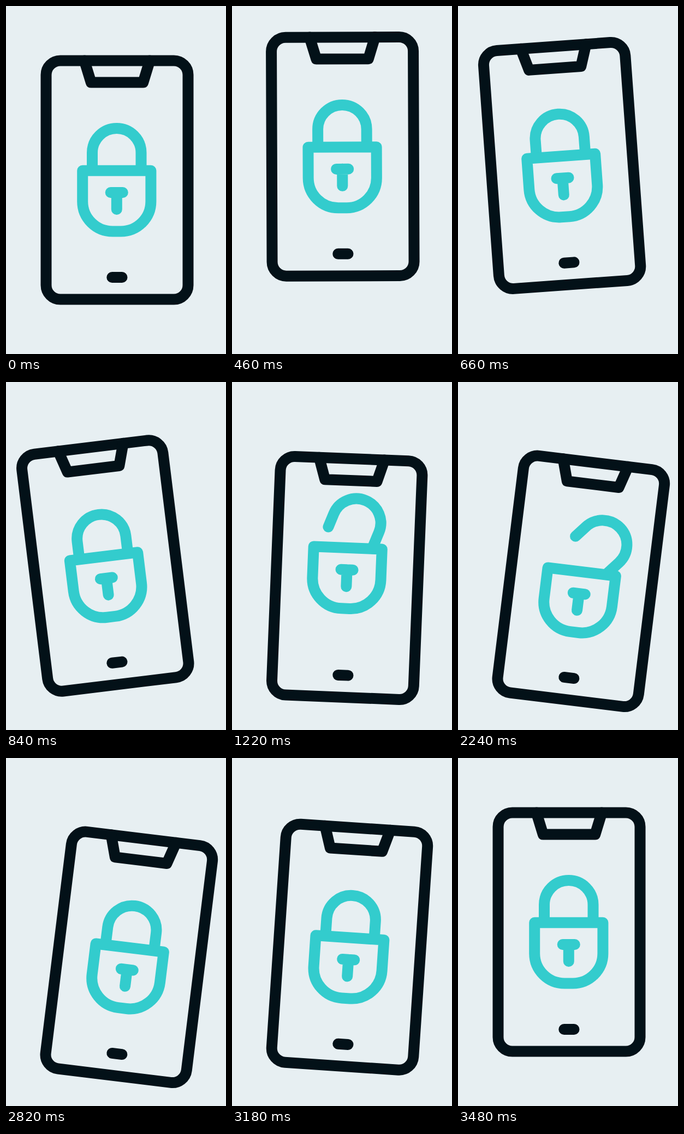
An HTML page for the animation above (3.6 s loop, 403x640 px).

```html
<!DOCTYPE html>
<html lang="en">
<head>
<meta charset="utf-8">
<title>Phone unlock</title>
<style>
  html, body { margin: 0; width: 100%; height: 100%; overflow: hidden; background: #e7eff2; }
  svg { display: block; width: 100%; height: 100%; }
  path, rect { fill: none; stroke-width: 20; stroke-linecap: round; stroke-linejoin: round; }
  #phone { stroke: #031118; }
  #lock { stroke: #33cccd; }
</style>
</head>
<body>
<svg viewBox="0 0 403 640">
  <g id="phone">
    <rect x="73.5" y="100.5" width="260" height="439" rx="26"/>
    <path d="M143.6 100.5 L155.8 140.5 H251.2 L263.4 100.5"/>
    <path d="M194.3 499 H212.5"/>
    <g id="lock">
      <path id="shackle" d="M158 296 V269.8 A44.75 44.75 0 0 1 247.5 269.8 V302"/>
      <path d="M140.2 302.7 H265.4 V359.5 A55 55 0 0 1 210.4 414.5 H195.2 A55 55 0 0 1 140.2 359.5 Z"/>
      <path d="M191.7 343 H213.8 M202.8 343 V374"/>
    </g>
  </g>
</svg>
<script>
  const LOOP = 3600;
  const HOP = 45.3, DROP = 45, LEAN = 7, OPEN = 40.5, LIFT = 38.2;
  const [phone, lock, shackle] = ['phone', 'lock', 'shackle'].map(id => document.getElementById(id));

  // Sine ease from 0 to 1 between two times; a skew below 1 gives a quicker start
  function ease(t, from, to, skew = 1) {
    const u = Math.min(1, Math.max(0, (t - from) / (to - from)));
    return (1 - Math.cos(Math.PI * u ** skew)) / 2;
  }

  function draw(t) {
    // The phone hops, lands lower and finally slides back
    const y = -HOP * ease(t, 220, 500)
      + (HOP + DROP - 5) * ease(t, 500, 1025)
      + 5 * ease(t, 1180, 1460)
      - DROP * ease(t, 3015, 3490, 0.8);
    // It leans left, then right, then straightens
    const lean = -LEAN * ease(t, 410, 860)
      + 2 * LEAN * ease(t, 860, 1455)
      - LEAN * ease(t, 3015, 3490, 0.72);
    // The lock is tossed up while the shackle swings open
    const lift = LIFT * (ease(t, 900, 1210) - ease(t, 1210, 1820));
    const open = OPEN * (ease(t, 960, 1485) - ease(t, 2235, 2685));

    phone.setAttribute('transform', `translate(0 ${y}) rotate(${lean} 203.4 499)`);
    lock.setAttribute('transform', `translate(0 ${-lift})`);
    shackle.setAttribute('transform', `rotate(${open} 247.5 302)`);
  }

  const start = performance.now();
  function tick() {
    draw((performance.now() - start) % LOOP);
    requestAnimationFrame(tick);
  }
  tick();
</script>
</body>
</html>
```
